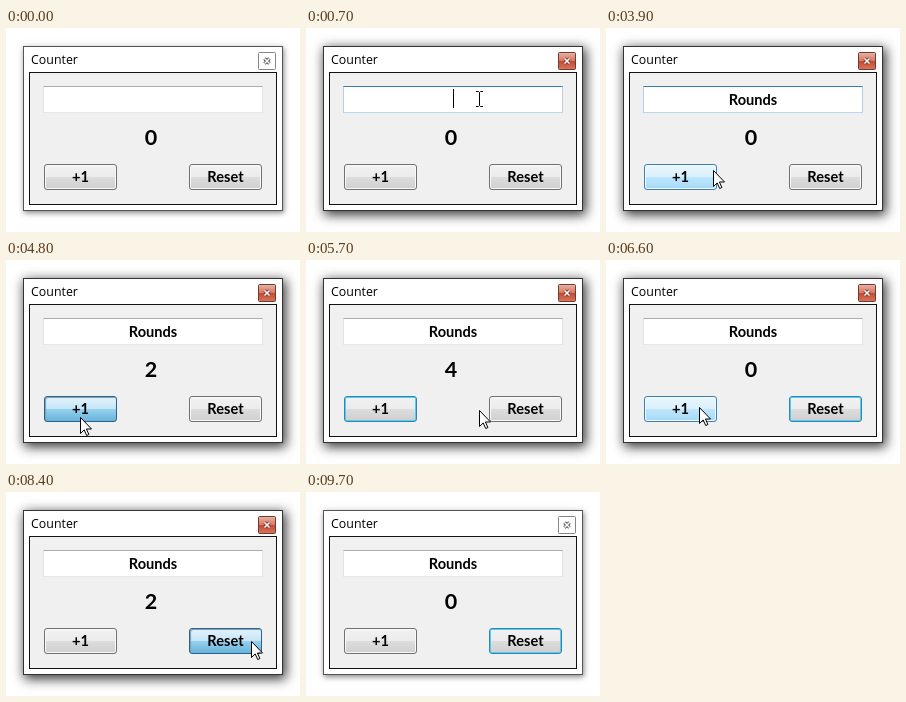
An HTML page that plays this animation: 294 by 204 pixels, repeating every 9.8 s.

```html
<!DOCTYPE html>
<html lang="en">
<head>
<meta charset="utf-8">
<title>Counter</title>
<style>
  html, body { margin: 0; width: 100%; height: 100%; overflow: hidden; background: #fff; }
  div, span, svg { position: absolute; box-sizing: border-box; }
  #stage { left: 0; top: 0; width: 294px; height: 204px; overflow: hidden; font: 700 14.6px Lato, sans-serif; color: #000; }
  #win { left: 17px; top: 18px; width: 260px; height: 165px; background: #fff; border: 1px solid #555;
    box-shadow: 1px 2px 5px rgba(0,0,0,.42), 0 1px 11px rgba(0,0,0,.08); }
  .active #win { border-color: #333; box-shadow: 2px 3px 11px 1px rgba(0,0,0,.78); }
  #title { left: 25px; top: 23px; font: 400 12.4px/18px "Open Sans", sans-serif; }
  #close { left: 252px; top: 24px; width: 18px; height: 18px; }
  #close rect { fill: #fff; stroke: #858585; }
  #close .edge { stroke: #555; stroke-width: 3.4; }
  #close .cross { stroke: #fff; stroke-width: 1.5; }
  .active #close rect { fill: url(#red); stroke: #6d3c34; }
  .active #close .edge { stroke: #8d3a2c; }
  #client { left: 23px; top: 44px; width: 248px; height: 133px; background: #f0f0f0; border: 1px solid #111; }
  #field { left: 37px; top: 58px; width: 220px; height: 27px; background: #fff; border: 1px solid;
    border-color: #abadb3 #e2e3ea #e3e9ef; text-align: center; }
  #field.focus { border-color: #3d7bad #b5cfe7 #b7d9ed; }
  #entry { position: relative; display: inline-block; height: 25px; line-height: 25px; }
  #caret { left: 100%; top: 2px; width: 1px; height: 19px; background: #000; }
  #count { left: 115px; top: 94px; width: 60px; text-align: center; font-size: 21.5px; line-height: 30px; }
  .btn { top: 136px; width: 73px; height: 26px; line-height: 24px; text-align: center; border: 1px solid #707070; border-radius: 3px;
    background: linear-gradient(#f2f2f2, #ebebeb 50%, #ddd 50%, #cfcfcf); box-shadow: inset 0 0 0 1px #fafafa; }
  .btn.focus { border-color: #3c7fb1; box-shadow: inset 0 0 0 1px #48d2f7; }
  .btn.hover { border-color: #3c7fb1; background: linear-gradient(#eaf6fd, #d9f0fc 50%, #bee6fd 50%, #a7d9f5); box-shadow: inset 0 0 0 1px #f4fbfe; }
  .btn.press { border-color: #2c628b; background: linear-gradient(#e5f4fc, #c4e5f6 50%, #98d1ef 50%, #68b3db); box-shadow: inset 1px 1px 1px #7a9eb1; }
  #plus { left: 38px; }
  #reset { left: 183px; }
  #arrow, #beam { left: 0; top: 0; overflow: visible; }
</style>
</head>
<body>
<div id="stage">
  <div id="win"></div>
  <div id="title">Counter</div>
  <svg id="close" viewBox="0 0 18 18">
    <linearGradient id="red" x2="0" y2="1">
      <stop offset="0" stop-color="#e9b3a4"/><stop offset=".48" stop-color="#d97a65"/>
      <stop offset=".5" stop-color="#c14a34"/><stop offset="1" stop-color="#d8765a"/>
    </linearGradient>
    <rect x=".5" y=".5" width="17" height="17" rx="1"/>
    <path class="edge" d="M6.5 6.5l5 5m0-5l-5 5"/>
    <path class="cross" d="M6.5 6.5l5 5m0-5l-5 5"/>
  </svg>
  <div id="client"></div>
  <div id="field"><span id="entry"><b id="word"></b><span id="caret"></span></span></div>
  <div id="count">0</div>
  <div id="plus" class="btn">+1</div>
  <div id="reset" class="btn">Reset</div>
  <svg id="arrow" width="12" height="19">
    <path d="M.5 .5v16l3.7-3.6 2.5 5.6 2.2-1-2.5-5.5h5.1z" fill="#fff" stroke="#000"/>
  </svg>
  <svg id="beam" width="8" height="16">
    <path d="M-3 -7.5h2.5l1 1 1-1H4M.5 -6.5v13M-3 7.5h2.5l1-1 1 1H4" fill="none" stroke="#000"/>
  </svg>
</div>
<script>
const LOOP = 9800;
const $ = id => document.getElementById(id);

// Pointer visits: runs of [time, x, y]; hidden between runs
const visits = [
  { end: 2000, keys: [[300, 276, 160], [500, 192, 82], [600, 175, 72], [700, 173, 71], [1200, 197, 99]] },
  { end: 9000, keys: [[3400, 190, 103], [4100, 74, 157], [5300, 74, 157], [5900, 222, 147], [6200, 222, 147],
    [6600, 93, 147], [7700, 93, 147], [8000, 180, 158], [8200, 245, 149], [8700, 245, 149], [8900, 253, 134]] }
];
const typed = [2000, 2200, 2300, 2500, 2700, 3000];
const presses = { plus: [4200, 4800, 5100, 7000, 7300], reset: [6100, 8400] };
const counts = [[0, 0], [4300, 1], [4500, 2], [4900, 3], [5200, 4], [6200, 0], [7100, 1], [7400, 2], [8500, 0]];
const focuses = [[0, ""], [600, "field"], [4200, "plus"], [6100, "reset"], [7000, "plus"], [8400, "reset"]];
const carets = [[600, 1100], [1700, 3500], [4000, 4200]];

const latest = (list, t) => list.filter(e => e[0] <= t).pop()[1];
const inside = (p, x, y, w, h) => p && p[0] >= x && p[0] < x + w && p[1] >= y && p[1] < y + h;

function pointer(t) {
  const visit = visits.find(v => t >= v.keys[0][0] && t < v.end);
  if (!visit) return null;
  const i = visit.keys.findIndex(k => k[0] > t);
  if (i < 0) return visit.keys[visit.keys.length - 1].slice(1);
  const [a, b] = [visit.keys[i - 1], visit.keys[i]];
  const u = (t - a[0]) / (b[0] - a[0]);
  return [1, 2].map(n => Math.round(a[n] + (b[n] - a[n]) * u));
}

function place(id, shown, p) {
  const el = $(id);
  el.style.display = shown ? "block" : "none";
  if (shown) el.style.transform = `translate(${p[0]}px, ${p[1]}px)`;
}

function draw(time) {
  const t = Math.floor(time % LOOP / 100) * 100;
  const p = pointer(t);
  const focus = latest(focuses, t);
  const overField = inside(p, 37, 58, 220, 27);

  $("stage").classList.toggle("active", t >= 600 && t < 9700);
  $("field").classList.toggle("focus", focus === "field");
  $("word").textContent = "Rounds".slice(0, typed.filter(k => k <= t).length);
  $("caret").hidden = !carets.some(([on, off]) => t >= on && t < off);
  $("count").textContent = latest(counts, t);
  for (const [id, x] of [["plus", 38], ["reset", 183]]) {
    const list = $(id).classList;
    list.toggle("focus", focus === id);
    list.toggle("hover", !!inside(p, x, 136, 73, 26));
    list.toggle("press", presses[id].includes(t));
  }
  place("arrow", p && !overField, p);
  place("beam", overField, p);
}

const start = performance.now();
function tick() {
  draw(performance.now() - start);
  requestAnimationFrame(tick);
}
draw(0);
requestAnimationFrame(tick);
</script>
</body>
</html>
```
